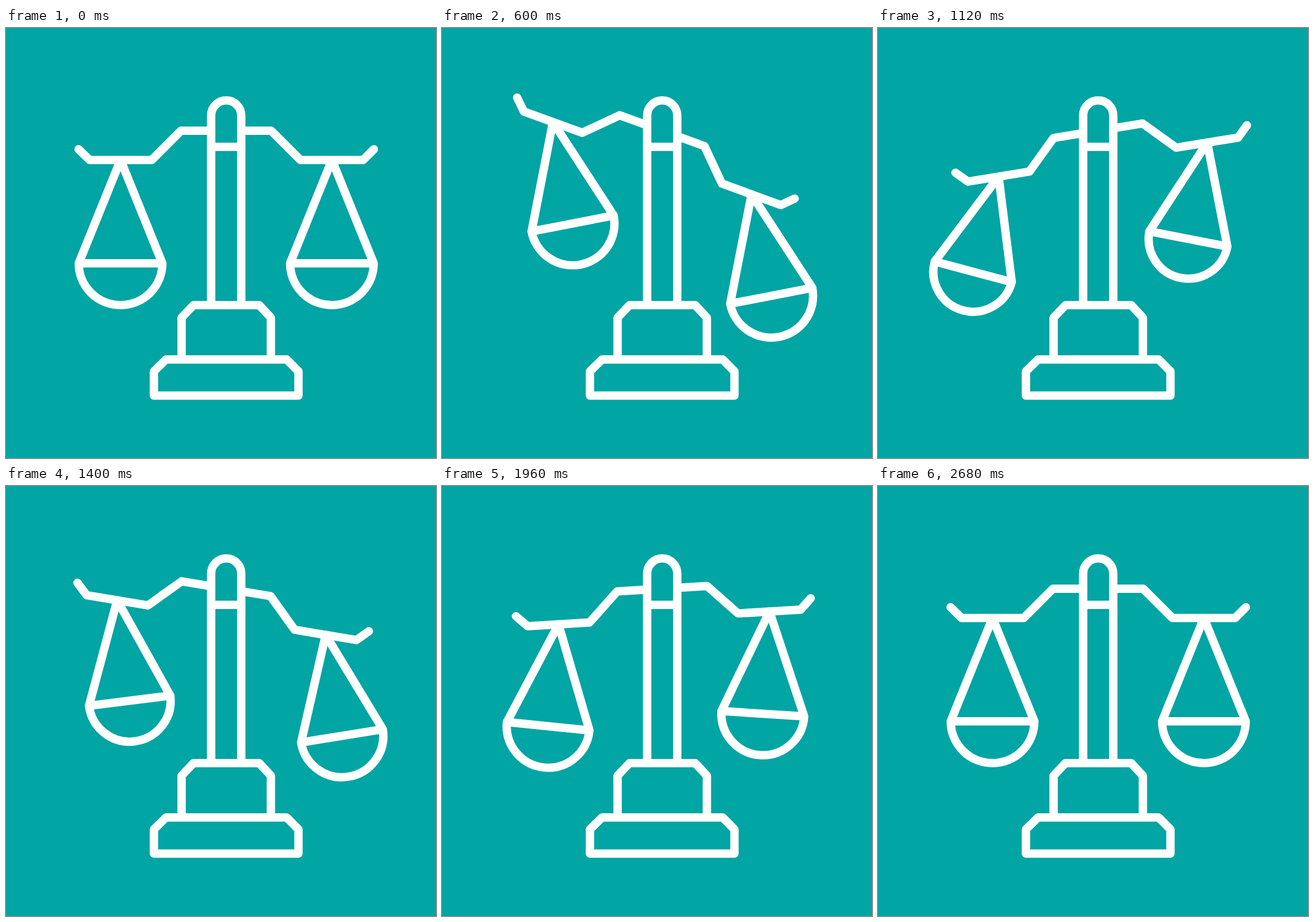
Write an HTML page that moves like this. It is 720 px wide and 720 px high and loops after 3 s.

```html
<!DOCTYPE html>
<html lang="en">
<head>
<meta charset="utf-8">
<title>Scales</title>
<style>
html, body { margin: 0; width: 100%; height: 100%; overflow: hidden; background: #00a5a4; }
svg { display: block; width: 100vw; height: 100vh; }
path { fill: none; stroke: #fff; stroke-width: 14; stroke-linecap: round; stroke-linejoin: round; }
.pan path { vector-effect: non-scaling-stroke; }
.post { fill: #00a5a4; stroke-linecap: butt; }
</style>
</head>
<body>
<svg viewBox="0 0 720 720">
  <g id="beam">
    <path d="M121.5 203L140 221H244L293 172H444L493 221H598L616 203"/>
    <g class="pan" id="left"><path d="M0 0L-70 173A70 70 0 0 0 70 173ZM-70 173H70"/></g>
    <g class="pan" id="right"><path d="M0 0L-70 173A70 70 0 0 0 70 173ZM-70 173H70"/></g>
  </g>
  <path class="post" d="M343.5 464V146.5a25.2 25.2 0 0 1 50.4 0V464M343.5 199H393.9"/>
  <path d="M294 555V485L314 464H424L443.5 485V555"/>
  <path d="M247.7 615.5V575L268 555H470L489.7 575V615.5Z"/>
</svg>
<script>
const LOOP = 3000, STEP = 40, FPS = 24;
const START = 4, SWING = 10; // in drawing frames
const PIVOT = [368.75, 172];

const soft = [.33, .67], quick = [.33, .62], slow = [.37, .67], late = [.5, .66];
const beamTrack = { keys: [0, 20, -15, 10, -5, 2, 0], eases: [[.31, .6], quick, quick, late, soft, soft] };
const pans = [
  { id: 'left', x: 191.8, keys: [0, -31, 31, -19.2, 13.2, -5, 0], eases: [slow, quick, [.43, .8], late, soft, soft] },
  { id: 'right', x: 545.7, keys: [0, -31, 28.3, -20, 11.1, -7, 0], eases: [slow, soft, [.4, .69], late, soft, soft] }
];

const $ = id => document.getElementById(id);
const mix = (a, b, w) => a + (b - a) * w;

// cubic-bezier(p, 0, q, 1)
function ease([p, q], x) {
  let lo = 0, hi = 1;
  for (let i = 0; i < 24; i++) {
    const t = (lo + hi) / 2, u = 1 - t;
    if (3 * u * u * t * p + 3 * u * t * t * q + t * t * t < x) lo = t; else hi = t;
  }
  return lo * lo * (3 - 2 * lo);
}

function sample({ keys, eases }, frame) {
  const pos = Math.min(Math.max((frame - START) / SWING, 0), eases.length);
  const i = Math.min(Math.floor(pos), eases.length - 1);
  const x = pos - i;
  const w = x <= 0 ? 0 : x >= 1 ? 1 : ease(eases[i], x);
  return [keys[i], keys[i + 1], w];
}

function draw(time) {
  const tick = Math.floor((time % LOOP + .5) / STEP) * STEP;
  const frame = Math.floor(tick * FPS / 1000 + .26);
  $('beam').setAttribute('transform', `rotate(${mix(...sample(beamTrack, frame))} ${PIVOT})`);
  for (const pan of pans) {
    // Blending matrices makes the pans shrink in mid-swing
    const [from, to, w] = sample(pan, frame);
    const a = from * Math.PI / 180, b = to * Math.PI / 180;
    const c = mix(Math.cos(a), Math.cos(b), w), s = mix(Math.sin(a), Math.sin(b), w);
    $(pan.id).setAttribute('transform', `matrix(${c} ${s} ${-s} ${c} ${pan.x} 221)`);
  }
}

const t0 = performance.now();
function loop() {
  draw(performance.now() - t0);
  requestAnimationFrame(loop);
}
loop();
</script>
</body>
</html>
```
